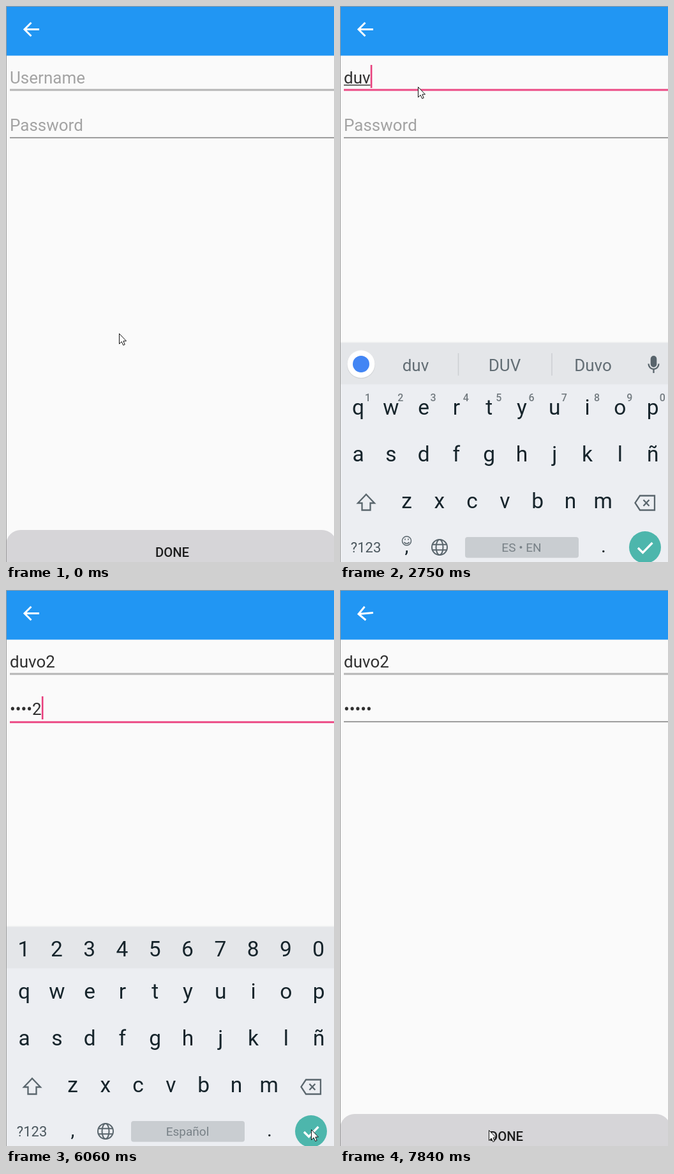
Animation, 514 px wide and 868 px high, one loop 7990 ms. Source, as an HTML page:

```html
<!DOCTYPE html>
<html lang="es">
<head>
<meta charset="utf-8">
<title>Login form</title>
<style>
  html, body { margin: 0; width: 100%; height: 100%; overflow: hidden; background: #fafafa; }
  svg { display: block; width: 514px; height: 868px; font-family: Roboto, sans-serif; }
  .field { font-size: 26px; white-space: pre; }
  .keys { font-size: 33.5px; fill: #16242b; text-anchor: middle; }
  .small { font-size: 16px; font-weight: 500; fill: #737b80; }
  .words { font-size: 26px; fill: #626d74; text-anchor: middle; }
  .icon { fill: none; stroke: #5a666d; stroke-width: 2.3; }
</style>
</head>
<body>
<svg viewBox="0 0 514 868">
  <rect width="514" height="868" fill="#fafafa"/>
  <rect width="514" height="77.5" fill="#2196f3"/>
  <path id="arrow" d="M52 36.5H29.5M39.5 26 29 36.5 39.5 47" fill="none" stroke="#fff" stroke-width="3"/>

  <text id="user" class="field" x="6" y="120.5"/>
  <path id="composing" d="M6 123.5H48" stroke="#333" stroke-width="1.6"/>
  <rect id="userLine" x="6" y="129.5" width="508" height="3"/>
  <text id="pass" class="field" x="6" y="195"/>
  <rect id="passLine" x="6" width="508"/>
  <rect id="caret" width="2.6" height="36" fill="#e8407d"/>

  <rect x="0" y="818" width="518" height="80" rx="23" fill="#d6d5d8"/>
  <text x="260.5" y="860" font-size="20.3" font-weight="500" text-anchor="middle" fill="#1d1d1d">DONE</text>

  <g id="keyboard">
    <rect y="524.5" width="514" height="2" fill="#eeeff0"/>
    <rect y="526" width="514" height="350" fill="#eceef2"/>
    <rect y="526" width="514" height="64.5" fill="#e4e6e9"/>
    <g id="letters" class="keys"></g>

    <g id="textMode">
      <circle cx="33" cy="560" r="22" fill="#d3d5d8"/>
      <circle cx="33" cy="559" r="21.5" fill="#fff"/>
      <circle cx="33" cy="559" r="13" fill="#4285f4"/>
      <path d="M185.5 542V577M332 542V577" stroke="#cdd0d4" stroke-width="1.6"/>
      <g id="words" class="words"></g>
      <rect x="486.7" y="546" width="9.6" height="18" rx="4.8" fill="#58646c"/>
      <path class="icon" d="M483.5 558.5a8 8.5 0 0 0 16 0M491.5 567V573"/>
      <g id="hints" class="keys small"></g>
      <g class="icon" stroke-width="1.5" style="stroke-width:1.5">
        <circle cx="104.500" cy="835" r="7"/>
        <path d="M100.500 837a4.500 4 0 0 0 8 0M102 831.500v2.200M107 831.500v2.200"/>
      </g>
    </g>
    <g id="passMode" class="keys"></g>

    <path class="icon" d="M41 762.500 54 776H47.500V787H34.500V776H28Z"/>
    <path class="icon" d="M470 764.500H493V787H470L462.500 775.700ZM475.500 771 484.500 780.500M484.500 771 475.500 780.500"/>
    <text x="40.500" y="853" font-size="22" text-anchor="middle" fill="#4b575e">?123</text>
    <g class="keys"><text x="104.500" y="853" font-size="30">,</text><text x="413" y="853" font-size="30">.</text></g>
    <g class="icon" style="stroke-width:2">
      <circle cx="156" cy="845" r="12"/>
      <ellipse cx="156" cy="845" rx="5.500" ry="12"/>
      <path d="M145 840.800H167M145 849.200H167"/>
    </g>
    <rect x="196" y="829" width="178" height="32.500" rx="4" fill="#c9cdd1"/>
    <text id="space" x="284.500" y="852" font-size="19" text-anchor="middle" fill="#788187"/>
    <circle cx="478" cy="845" r="25" fill="#4db6ac"/>
    <path d="M467 846 474.500 853.500 489.500 838" fill="none" stroke="#fff" stroke-width="3.300"/>
  </g>

  <path d="M0 .5H514M.5 0V868" stroke="#9b9b9b"/>
  <path id="mouse" d="M.5 .5V16.500L4.200 13 6.700 18.500 9.200 17.500 6.900 12H11.500Z" fill="#fff" stroke="#111"/>
</svg>
<script>
const LOOP = 7990, PINK = '#ec4a85';
const $ = id => document.getElementById(id);

// Each track lists [start in ms, value...]; a value holds until the next entry.
const tracks = {
  mouse: [[0, 177, 511], [310, 175, 490], [467, 166, 420], [623, 150, 320], [780, 134, 205], [937, 122, 126],
    [5210, 135, 150], [5355, 200, 290], [5500, 290, 480], [5645, 368, 660], [5790, 403, 787],
    [6060, 478, 842], [6210, 480, 847], [7170, 455, 848], [7304, 385, 847], [7438, 290, 845], [7572, 233, 843]],
  slide: [[0, 345], [1250, 290], [1530, 117], [1650, 30], [1900, 0], [6600, 45], [6740, 158], [6890, 290], [7020, 345]],
  focus: [[0, ''], [1093, 'user'], [3350, 'pass'], [6480, '']],
  mode: [[0, 'text'], [3470, 'pass']],
  caret: [[0, 0], [1093, 1], [2330, 0], [2600, 1], [4510, 0], [4810, 1], [5355, 0], [5790, 1]],
  user: [[0, ''], [2600, 'du'], [2750, 'duv'], [2870, 'duvo'], [3110, 'duvo2']],
  pass: [[0, ''], [3710, '•u'], [3980, '•••o'], [4810, '••••2'], [6360, '•••••']],
  tilt: [[0, 0], [7840, -5]]
};
const at = (name, t) => tracks[name].filter(entry => entry[0] <= t).pop().slice(1);

const row = (chars, x, y) => [...chars].map((c, i) =>
  `<text x="${x + i * 51.3}" y="${y}">${c}</text>`).join('');
$('letters').innerHTML = row('qwertyuiop', 28.5, 638) + row('asdfghjklñ', 28.5, 710.5) + row('zxcvbnm', 104.5, 783.5);
$('hints').innerHTML = row('1234567890', 43.5, 616.5);
$('passMode').innerHTML = row('1234567890', 28, 572);
$('words').innerHTML = [118.5, 258, 396.5].map(x => `<text x="${x}" y="569.5"/>`).join('');

const set = (id, attrs) => {
  for (const key in attrs) $(id).setAttribute(key, attrs[key]);
};
const show = (id, on) => set(id, { visibility: on ? 'visible' : 'hidden' });
const write = (id, value, hint) => {
  $(id).textContent = value || hint;
  set(id, { fill: value ? '#303030' : '#a3a3a3' });
};

function draw(t) {
  const [user] = at('user', t), [pass] = at('pass', t);
  const [focus] = at('focus', t), [mode] = at('mode', t);
  write('user', user, 'Username');
  write('pass', pass, 'Password');
  set('userLine', { fill: focus === 'user' ? PINK : '#b5b5b5' });
  set('passLine', focus === 'pass' ? { fill: PINK, y: 204.8, height: 3 } : { fill: '#828282', y: 204.8, height: 1.6 });

  const value = focus === 'pass' ? pass : user;
  const width = value && focus ? $(focus).getComputedTextLength() : 0;
  show('caret', focus && at('caret', t)[0]);
  set('caret', { x: 6.2 + width, y: focus === 'pass' ? 166 : 92 });
  show('composing', focus === 'user' && user);
  if (focus === 'user') set('composing', { d: `M6 123.5H${6 + width}` });

  show('textMode', mode === 'text');
  show('passMode', mode === 'pass');
  $('space').textContent = mode === 'text' ? 'ES • EN' : 'Español';
  const stem = user.slice(0, 3) === user ? 'Duvo' : user[0]?.toUpperCase() + user.slice(1);
  const words = user ? [user, user.toUpperCase(), stem] : ['y', 'no', 'el'];
  words.forEach((word, i) => $('words').children[i].textContent = word);

  set('keyboard', { transform: `translate(0 ${at('slide', t)})` });
  set('mouse', { transform: `translate(${at('mouse', t)})` });
  set('arrow', { transform: `rotate(${at('tilt', t)} 40 36.5)` });
}

const start = performance.now();
function tick() {
  draw((performance.now() - start) % LOOP);
  requestAnimationFrame(tick);
}
tick();
</script>
</body>
</html>
```
